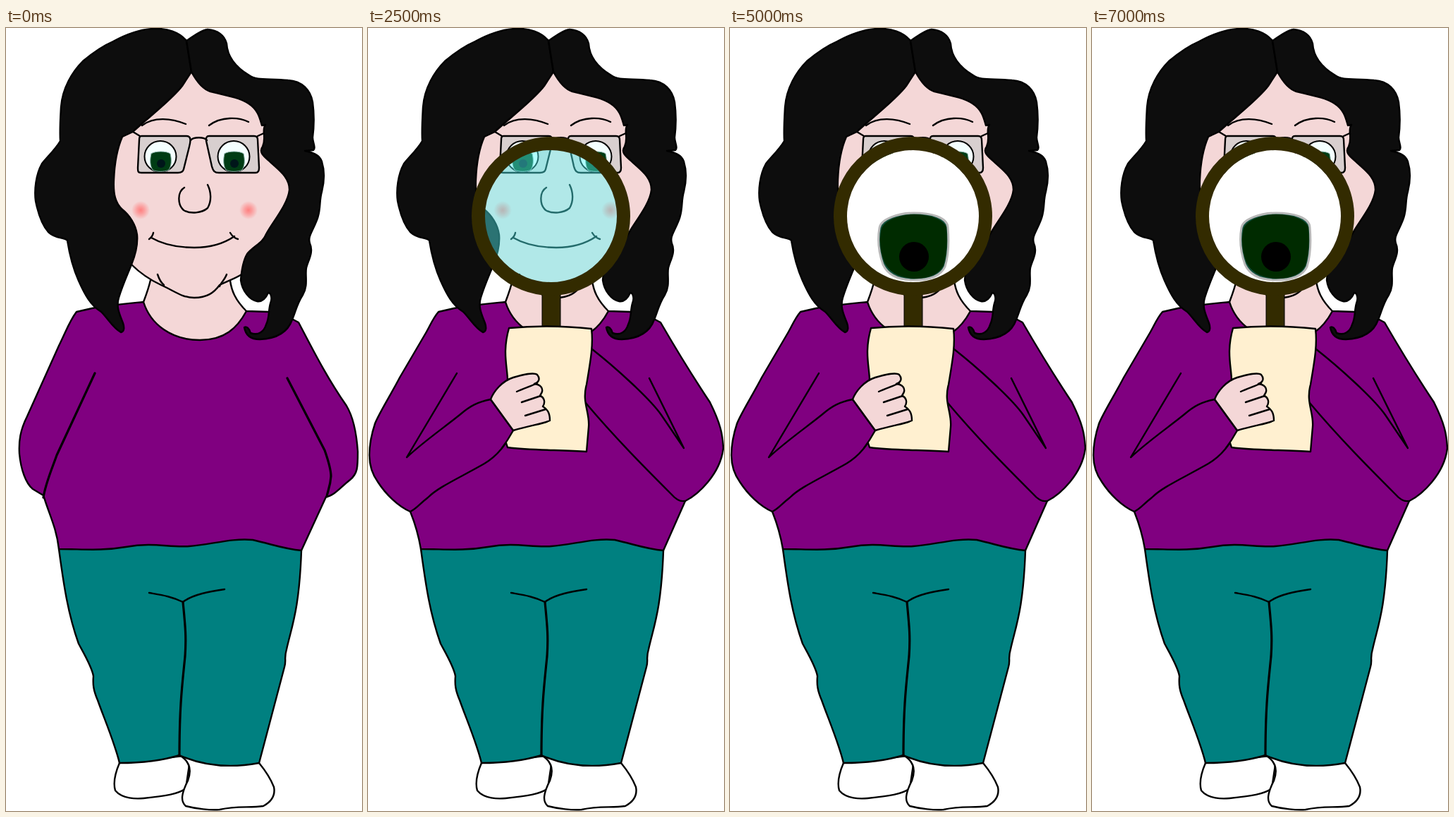
Recreate the animation shown at these times as an HTML page. Size 505 px wide and 1109 px high, loop 8 s.

```html
<!DOCTYPE html>
<html lang="en">
<head>
<meta charset="utf-8">
<title>Magnifying glass</title>
<style>
html, body { margin: 0; width: 100%; height: 100%; overflow: hidden; background: #fff; }
svg { display: block; width: 100vw; height: 100vh; }
.line { fill: none; stroke: #000; stroke-width: 2.4; stroke-linecap: round; stroke-linejoin: round; }
.skin { fill: #f4d7d7; }
.hair { fill: #0d0d0d; }
.top { fill: #800080; }
.legs { fill: #008080; }
.shoe { fill: #fff; }
.paper { fill: #fff0d0; }
.specs { fill: #d8cfcf; }
.bold { stroke-width: 3.2; }
</style>
</head>
<body>
<svg viewBox="0 0 505 1109">
  <defs>
    <radialGradient id="blush">
      <stop offset="0" stop-color="#ff8080"/>
      <stop offset=".4" stop-color="#ff8080" stop-opacity=".65"/>
      <stop offset="1" stop-color="#ff8080" stop-opacity="0"/>
    </radialGradient>
    <clipPath id="rim"><circle cx="259.5" cy="267" r="94"/></clipPath>
    <g id="eye">
      <ellipse cy="-1" rx="22.5" ry="22" fill="#f4ffff" stroke="#000" stroke-width="2"/>
      <path d="M-13-5C-8-9 9-9 14-5C16 3 16 12 12 18C6 21-6 21-11 18C-15 12-15 3-13-5Z" fill="#003c14" stroke="#8fb5ac" stroke-width="1"/>
      <circle cx="1" cy="9" r="6" fill="#00161a" stroke="none"/>
    </g>
  </defs>

  <g class="line">
    <path class="shoe" d="M161 1041C155 1055 152 1070 155 1080C165 1092 185 1092 195 1091C225 1088 245 1085 255 1077L262 1030Z"/>
    <path class="shoe" d="M246 1030C260 1038 264 1050 258 1066C249 1084 247 1095 255 1102C270 1106 290 1108 303 1107C328 1101 345 1105 365 1102C378 1095 382 1085 380 1075C375 1062 368 1052 359 1041Z"/>
    <path class="legs" d="M75 738C82 790 88 830 103 872C110 885 122 905 124 918C123 930 124 938 130 952C140 980 155 1015 161 1041C190 1041 220 1038 246 1030C275 1043 310 1050 359 1041L395 905C398 895 394 893 398 880C405 848 416 825 419 740L390 700L110 700Z"/>
    <path d="M203 800C220 803 235 805 251 813C265 802 290 798 310 795"/>
    <path class="bold" d="M251 813C254 845 256 860 254 890C250 930 246 960 246 1030"/>

    <path class="top" id="sweater"/>
    <path id="leftDown" class="bold" d="M126 489L72 605C65 625 56 645 53 665"/>
    <path id="rightDown" class="bold" d="M399 496L452 598C458 615 461 625 461 635C460 650 456 656 455 664"/>
    <path id="rightUp" d="M399 496L448 595L416 548C400 525 350 480 318 455M308 530C350 580 395 625 430 660C437 668 443 671 449 670"/>
    <path id="leftUp" d="M126 489L55 608C80 585 105 568 130 548C145 535 155 530 174 526L206 570C195 590 185 605 165 617C130 637 100 650 85 665C72 675 70 680 60 685"/>

    <path class="skin" d="M205 357C202 370 198 380 195 388C205 420 235 442 275 442C310 442 328 425 341 401C325 385 320 372 318 358"/>
    <path class="skin" d="M263 62L140 150L140 250L170 300L178 335C190 347 205 357 220 364C240 373 250 382 267 382C285 382 295 375 303 364C315 358 325 355 336 348L415 260L420 150L340 80Z"/>
    <path d="M215 349C217 355 219 360 224 364M313 349C310 357 304 362 303 366"/>

    <path class="specs" d="M192 153L256 153C263 153 262 160 260 168L252 200C251 204 248 205 244 205L192 205C187 205 187 203 187 198L189 158Q189 153 192 153Z"/>
    <path class="specs" d="M288 153L352 153Q357 153 357 158L359 198Q359 205 354 205L302 205C296 205 294 203 292 196L284 160Q283 153 288 153Z"/>
    <path d="M262 159C266 154 281 154 285 159M190 153L180 147M357 153L368 148"/>
    <use href="#eye" x="219" y="183"/>
    <use href="#eye" x="323" y="183"/>
    <path d="M193 138C210 125 235 128 255 136M288 138C305 125 330 126 344 133"/>
    <path d="M253 226C243 232 243 250 252 258C262 264 278 262 286 255C292 245 291 232 286 222"/>
    <path d="M206 297C225 308 245 311 267 311C290 311 308 306 324 295M203 299C206 297 208 295 209 290M318 290C321 295 325 298 329 299"/>
    <g fill="url(#blush)" stroke="none">
      <circle cx="191" cy="258" r="13"/>
      <circle cx="344" cy="258" r="13"/>
    </g>

    <path class="hair" d="M263 62L256 18C245 5 228 1 215 1C190 0 165 12 152 19C138 25 122 36 109 47C94 62 80 85 78 112C77 130 76 145 77 160C70 172 58 183 51 192C42 208 40 230 42 245C46 265 52 280 60 289C72 300 82 295 87 301C90 320 95 340 103 358C112 378 120 393 135 402C145 412 152 425 163 431C168 430 168 424 166 418C161 405 156 395 160 382C165 365 172 350 178 335C185 318 187 305 186 293C184 278 175 265 165 257C155 248 152 235 153 215C154 190 158 170 165 154L180 147C200 128 235 102 250 82Z"/>
    <path class="hair" d="M263 62L256 18C268 10 278 3 286 2C300 3 310 10 313 22C314 40 325 55 345 67C355 75 375 71 400 74C420 75 432 88 435 105C437 120 437 140 435 155C435 162 440 170 436 173L424 174C432 176 444 178 448 189C453 205 451 220 448 232C444 245 447 258 441 272C434 290 428 295 431 305C437 318 428 330 426 340C424 350 429 365 421 378C412 392 411 402 406 413C400 430 385 440 360 441C348 441 340 436 338 424C341 422 345 425 347 432C358 436 366 430 369 420C374 410 372 400 375 390C378 383 376 375 372 375C368 384 362 388 356 387C345 385 335 372 333 357C334 345 336 330 342 320C352 308 364 305 369 292C378 275 400 250 402 229C402 210 385 200 373 188C366 182 358 176 364 168C370 155 362 145 368 137L363 138C360 128 358 116 344 107C330 98 310 95 290 90C280 87 270 75 263 62Z"/>
  </g>

  <g id="glass">
    <rect x="247" y="374" width="26" height="56" fill="#332b00" stroke="#000"/>
    <circle id="tint" cx="259.5" cy="267" r="95" fill="#5ff" fill-opacity=".42"/>
    <g id="zoom" clip-path="url(#rim)">
      <circle cx="259.5" cy="267" r="95" fill="#fff"/>
      <g id="iris">
        <path d="M212 283C214 270 240 262 261 262C285 262 308 268 309 282C311 305 309 325 305 338C298 353 280 357 261 357C238 357 224 350 217 335C211 318 209 300 212 283Z" fill="#12503c" stroke="#b8b8b8" stroke-width="3"/>
        <path d="M215 284C219 272 242 264 261 264C283 264 304 271 307 283C309 305 307 322 303 336C296 350 280 355 261 355C240 354 226 346 219 332C213 317 211 300 215 284Z" fill="#002b00"/>
        <circle cx="261" cy="324" r="21" fill="#000"/>
      </g>
    </g>
    <circle cx="259.5" cy="266.5" r="103" fill="none" stroke="#332b00" stroke-width="19"/>
  </g>

  <g id="note" class="line">
    <path class="paper" d="M200 425C240 421 280 422 317 426C320 450 315 475 310 505C303 530 315 545 313 565L310 600C275 597 235 599 198 594C188 570 199 540 198 500C198 480 190 460 200 425Z"/>
    <path class="top" stroke="none" d="M174 526L207 570L192 592L168 600Z"/>
    <path d="M174 526L206 570C201 579 196 587 190 595"/>
    <path class="skin" d="M174 526C178 515 190 500 206 495C220 491 235 487 240 491C245 497 242 502 236 504C245 505 248 510 247 515C246 518 244 520 244 521C250 523 252 530 248 536C256 541 258 547 258 556C250 560 235 562 206 570Z"/>
    <path d="M211 515C222 510 232 507 240 503M218 530L245 521M223 549L252 540"/>
  </g>
</svg>
<script>
const LOOP = 8000;

// start, left arm up, right arm up, enlarged eye, gaze shift
const steps = [
  [0, 0, 0, 0, 0],
  [1500, 1, 0, 0, 0],
  [2500, 1, 1, 0, 0],
  [3000, 1, 1, 1, 0],
  [4000, 1, 1, 1, -28],
  [5000, 1, 1, 1, 0],
  [6000, 1, 1, 1, 28],
  [7000, 1, 1, 1, 0]
];

const leftSide = [
  'C90 415 85 430 75 450L30 550C20 570 18 585 19 603C21 625 28 645 38 653L53 662L55 668C62 690 72 710 75 738',
  'C92 411 88 422 82 432L45 495C32 520 16 545 10 560C4 578 2 590 2 605C2 620 6 632 14 643C25 660 42 677 60 685C68 705 72 720 75 738'
];
const rightSide = [
  'L454 664C465 663 475 650 488 640C499 631 499 622 499 600C497 570 492 550 483 535C455 495 435 455 415 417',
  'L450 670C468 661 500 632 504 595C503 575 500 560 485 530C465 500 440 460 415 417'
];
const hem = 'C110 738 135 741 170 735C210 728 230 736 260 734C290 732 320 722 350 725C380 732 395 738 419 740';

const $ = id => document.getElementById(id);
const show = (id, on) => $(id).setAttribute('visibility', on ? 'inherit' : 'hidden');

function pose([, left, right, zoom, gaze]) {
  $('sweater').setAttribute('d',
    'M195 388C175 390 150 392 122 397L100 402' + leftSide[left] + hem +
    rightSide[right] + 'L398 408L372 402L341 401Z');
  show('leftDown', !left);
  show('leftUp', left);
  show('note', left);
  show('rightDown', !right);
  show('rightUp', right);
  show('glass', right);
  show('tint', right && !zoom);
  show('zoom', zoom);
  $('iris').setAttribute('transform', `translate(${gaze} 0)`);
}

let current;
function tick() {
  const t = performance.now() % LOOP;
  const step = steps.findLast(s => s[0] <= t);
  if (step !== current) pose(current = step);
  requestAnimationFrame(tick);
}
tick();
</script>
</body>
</html>
```
